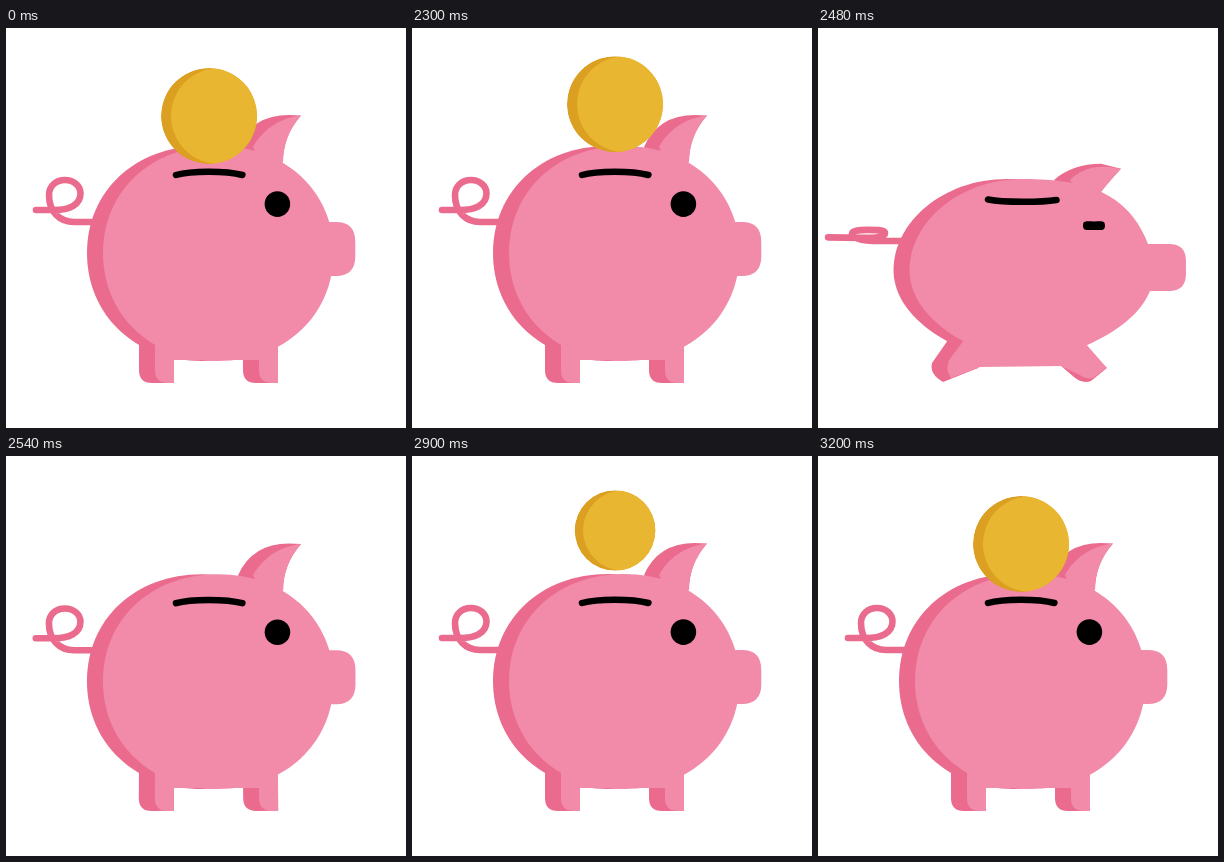
Animation of 400 by 400 pixels, one loop 3.23 s. Source, as an HTML page:

```html
<!DOCTYPE html>
<html lang="en">
<head>
<meta charset="utf-8">
<title>Piggy bank</title>
<style>
  html, body { margin: 0; width: 100%; height: 100%; overflow: hidden; background: #fff; }
  svg { display: block; width: 100%; height: 100%; }
</style>
</head>
<body>
<svg viewBox="0 0 400 400">
  <defs>
    <clipPath id="aboveSlot"><rect id="opening" width="400" height="147"/></clipPath>
    <clipPath id="disc"><circle r="48"/></clipPath>
  </defs>
  <g id="pig"></g>
  <g clip-path="url(#aboveSlot)">
    <g id="coin" clip-path="url(#disc)">
      <circle r="48" fill="#db9f21"/>
      <circle cx="10" r="48" fill="#e8b630"/>
    </g>
  </g>
  <g id="front"></g>
</svg>
<script>
const LOOP = 3230, STEP = 30, HOLD = 2030;
const DARK = '#ea6b8d', LIGHT = '#f28aa9';
const $ = id => document.getElementById(id);

const parts = [];
// Every path is given at rest and squashed, with the same commands in absolute x y pairs.
// What lies above springBase wobbles on its own after the squash.
function part(rest, squashed, fill, { stroke = 0, springBase = 0, parent = 'pig' } = {}) {
  const el = document.createElementNS('http://www.w3.org/2000/svg', 'path');
  el.setAttribute('fill', stroke ? 'none' : fill);
  if (stroke) {
    el.setAttribute('stroke', fill);
    el.setAttribute('stroke-width', stroke);
    el.setAttribute('stroke-linecap', 'round');
  }
  $(parent).append(el);
  parts.push({ el, rest, goal: squashed.match(/[\d.]+/g).map(Number), springBase });
}

// Replaces each number of a path by change(number, index).
const mapPath = (path, change) => {
  let i = 0;
  return path.replace(/[\d.]+/g, n => change(+n, i++));
};
const shiftLeft = path => mapPath(path, (n, i) => i % 2 ? n : n - 16);

const bodyRest = 'M97 225C97 163 145 118 212 118C279 118 327.5 163 327.5 225C327.5 287 279 333 212 333C145 333 97 287 97 225';
const bodySquashed = 'M91.5 242C91.5 195 140 151 205 151C270 151 318 165 335 232C345 290 270 322 212 336C140 322 91.5 285 91.5 242';

// tail, far legs, far side, ear back
part('M30 182L48 182C63 182 74.5 177 74.5 165.5C74.5 158 68 152 59 152C49 152 43 159 43 167C43 184 54 194 68 194L90 194',
     'M10 209.5L45 210C58 210 67 209 67 205C67 202 60 202 50 202C40 202 34 203 34 206C34 211 45 213 62 213L85 213',
     DARK, { stroke: 6.6, springBase: 194 });
part('M133 310L133 342Q133 355 146 355L168 355L168 310Z',
     'M130 312L114 335Q111 346 125 354L160 340L160 312Z', DARK);
part('M237 325L237 342Q237 355 250 355L272 355L272 325Z',
     'M242 337L256 349Q264 356 273 353L289 340L267 320Z', DARK);
part(shiftLeft(bodyRest), shiftLeft(bodySquashed), DARK);
part('M232 119Q246 87 283 87L295 87.5Q277 108 277 134L250 140Z',
     'M236 152Q255 136 283 136L303 141Q291 154 283 164L260 170Z', DARK, { springBase: 118 });

// near side, legs with belly, ear, snout
part(bodyRest, bodySquashed, LIGHT);
part('M149 310L149 342Q149 355 162 355L168 355L168 332L253 332L253 342Q253 355 266 355L272 355L272 318L272 310Z',
     'M146 312L131 332Q127 343 133 350L160 340L162 339L243 338L262 347Q269 352 275 350L289 340L267 315L267 310Z', LIGHT);
part('M247 119C256 103 272 90 295 87.5Q277 108 277 134L260 145Z',
     'M252 152C262 143 275 135 303 141Q291 154 283 164L265 175Z', LIGHT, { springBase: 118 });
part('M315 194L330 194Q349.3 194 349.3 214L349.3 228Q349.3 248 330 248L315 248Z',
     'M325 216L351 216Q368 216 368 233L368 246Q368 263 351 263L325 263Z', LIGHT);

// eye and slot
part('M258.6 176C258.6 169 264.3 163.3 271.4 163.3C278.5 163.3 284.2 169 284.2 176C284.2 183 278.5 188.9 271.4 188.9C264.3 188.9 258.6 183 258.6 176',
     'M265 197.7C265 192 269 193.5 276 193.5C283 193.5 287 192 287 197.7C287 203 283 202 276 202C269 202 265 203 265 197.7', '#000');
part('M170 147C185 142.5 220 142.5 236.4 147',
     'M170 171.5C186 174.5 222 174.5 238.5 172', '#000', { stroke: 6.5, parent: 'front' });

const progress = (t, a, b) => Math.min(1, Math.max(0, (t - a) / (b - a)));
const ease = (t, a, b) => (1 - Math.cos(Math.PI * progress(t, a, b))) / 2;

function coinY(t) {
  if (t < HOLD) return 88;
  if (t < 2600) return 48 + .0015 * (t - 2163) ** 2 + .0008 * Math.max(0, t - 2300) ** 2;
  if (t < 3000) return 74.5 - 24.5 * ease(t, 2920, 3000);
  if (t < 3080) return 50 + 29.5 * progress(t, 3000, 3080) ** 2;
  return 88 - 8.5 * (1 - progress(t, 3080, 3200)) ** 2;
}

function draw(t) {
  const squash = 1.2 * (ease(t, 2360, 2456) - ease(t, 2456, 2545));
  const wobble = .28 * Math.sin(Math.PI * progress(t, 2570, 2690));
  for (const { el, rest, goal, springBase } of parts) {
    el.setAttribute('d', mapPath(rest, (n, i) => {
      const dip = i % 2 ? wobble * Math.max(0, springBase - n) : 0;
      return (n + (goal[i] - n) * squash + dip).toFixed(2);
    }));
  }
  const scale = t < 2600 ? 1 : progress(t, 2720, 2934);
  $('coin').setAttribute('transform', `translate(203 ${coinY(t)}) scale(${scale})`);
  $('opening').setAttribute('height', 145 + 28 * squash);
}

function tick(now) {
  const t = now % LOOP;
  draw(t < HOLD ? 0 : HOLD + Math.floor((t - HOLD) / STEP) * STEP);
  requestAnimationFrame(tick);
}
draw(0);
requestAnimationFrame(tick);
</script>
</body>
</html>
```
